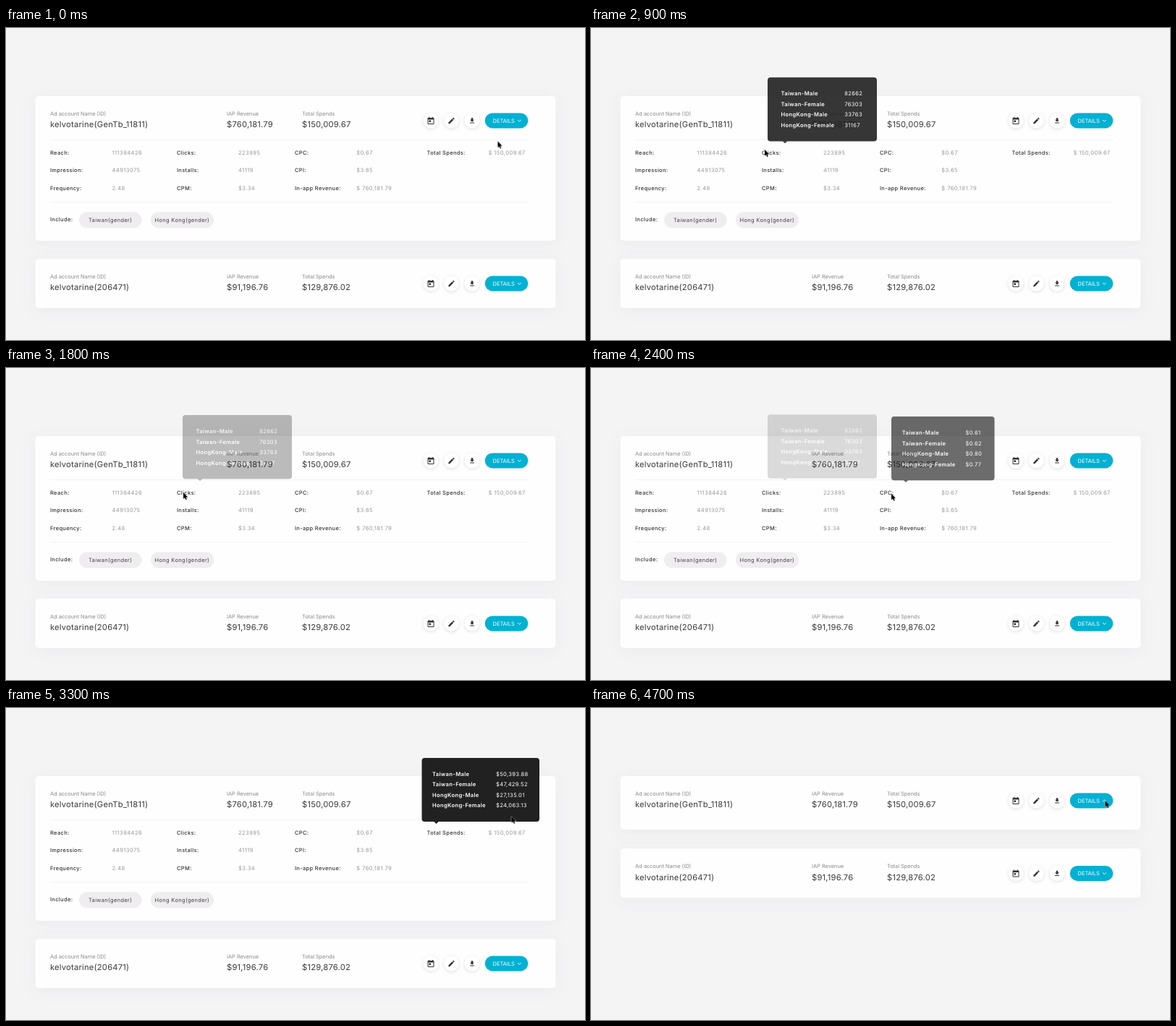
Write an HTML page that moves like this. It is 800 px wide and 431 px high and loops after 4800 ms.

```html
<!DOCTYPE html>
<html lang="en">
<head>
<meta charset="utf-8">
<title>Ad account details</title>
<style>
@property --a { syntax: '<number>'; initial-value: 0; inherits: false; }

html, body { margin: 0; width: 100%; height: 100%; overflow: hidden; background: #f4f4f5; }
svg { display: block; width: 100%; height: 100%; }
text { font: 7.5px Inter, Roboto, sans-serif; letter-spacing: .33px; text-rendering: geometricPrecision; white-space: pre; }

.card { fill: #fefefe; filter: drop-shadow(0 3px 10px rgba(50, 45, 55, .05)); }
.cap { font-size: 7.4px; letter-spacing: 0; fill: #8a8a8a; }
.big { font-size: 11.2px; letter-spacing: .22px; fill: #3a3a3a; }
.key { font-weight: 500; fill: #333; }
.val { font-size: 7.6px; letter-spacing: .42px; fill: #999; }
.chip { fill: #efedef; }
.chipText { fill: #444; }
.rule { stroke: #f3f2f3; }
.round { fill: #fff; filter: drop-shadow(0 1px 2px rgba(0, 0, 0, .13)); }
.icon { fill: #333; }
.button { fill: #00b1d2; }
.buttonText { letter-spacing: 0; fill: #fff; }
.chevron { fill: none; stroke: #fff; stroke-width: .9; transform-box: fill-box; transform-origin: center; }

.tip { opacity: var(--a); transform: translateY(calc((var(--a) - 1) * 5.4px)); }
.tip path, .tip rect { fill: #212121; }
.tip text { font-size: 7.6px; fill: #fff; }
.tip .name { font-weight: 600; letter-spacing: .35px; }
.cursor { fill: #000; stroke: #fff; stroke-width: .7; paint-order: stroke; }

/* Every animation shares one 4.8 s loop; 100 ms is 2.0833%. */
.shrink, .lift, .details, .flip, .tip, .cursor { animation: 4.8s linear infinite; }
.shrink { height: 200px; animation-name: shrink; }
.lift { animation-name: lift; }
.details { animation-name: fade; }
.flip { animation-name: flip; }
.reach { animation-name: reach; }
.clicks { animation-name: clicks; }
.cpc { animation-name: cpc; }
.spends { animation-name: spends; }
.cursor { animation-name: point; }

@keyframes shrink {
  0%, 89.583% { height: 200px; animation-timing-function: ease-in-out; }
  97.917%, 100% { height: 74px; }
}
@keyframes lift {
  0%, 89.583% { transform: translateY(0); animation-timing-function: ease-in-out; }
  97.917%, 100% { transform: translateY(-124.5px); }
}
@keyframes fade {
  0%, 89.583% { opacity: 1; }
  96.5%, 100% { opacity: 0; }
}
@keyframes flip {
  0%, 89.583% { transform: rotate(0); }
  97.917%, 100% { transform: rotate(180deg); }
}
@keyframes reach {
  0%, 20.833% { --a: 0; }
  25% { --a: .65; }
  29.167% { --a: 1; }
  31.25% { --a: .9; }
  35.417% { --a: .2; }
  37.5%, 100% { --a: 0; }
}
@keyframes clicks {
  0%, 12.5% { --a: 0; }
  16.667% { --a: .75; }
  18.75% { --a: .9; }
  22.917% { --a: .25; }
  25% { --a: .03; }
  27.083%, 35.417% { --a: 0; }
  39.583% { --a: .6; }
  41.667% { --a: .95; }
  45.833% { --a: .9; }
  50% { --a: .16; }
  52.083%, 100% { --a: 0; }
}
@keyframes cpc {
  0%, 4.167% { --a: 0; }
  8.333% { --a: .75; }
  10.417% { --a: .93; }
  12.5% { --a: .8; }
  16.667% { --a: .2; }
  18.75%, 45.833% { --a: 0; }
  50% { --a: .66; }
  54.167%, 56.25% { --a: 1; }
  60.417% { --a: .5; }
  62.5% { --a: .14; }
  64.583%, 100% { --a: 0; }
}
@keyframes spends {
  0% { --a: 0; }
  4.167% { --a: .7; }
  8.333% { --a: .2; }
  10.417% { --a: .02; }
  12.5%, 58.333% { --a: 0; }
  62.5% { --a: .57; }
  66.667%, 68.75% { --a: 1; }
  72.917% { --a: .2; }
  75%, 100% { --a: 0; }
}
@keyframes point {
  0% { transform: translate(679.5px, 156.5px); }
  2.083% { transform: translate(655px, 165px); }
  6.25% { transform: translate(480px, 169px); }
  10.417% { transform: translate(397.5px, 165.5px); }
  12.5% { transform: translate(376px, 166px); }
  18.75% { transform: translate(240px, 168px); }
  25% { transform: translate(152.5px, 164.5px); }
  29.167% { transform: translate(130px, 168px); }
  33.333% { transform: translate(195px, 171px); }
  45.833% { transform: translate(345px, 174px); }
  50% { transform: translate(415px, 173.5px); }
  56.25% { transform: translate(505px, 174px); }
  62.5% { transform: translate(635.5px, 171.5px); }
  66.667% { transform: translate(690px, 164px); }
  75%, 77.083% { transform: translate(724px, 107px); }
  79.167% { transform: translate(720px, 110px); }
  87.5%, 100% { transform: translate(710.5px, 128px); }
}
</style>
</head>
<body>
<svg id="stage" viewBox="0 0 800 431"></svg>
<script>
const LOOP = 4800, STEP = 100, LEAD = 20;

const text = (x, y, str, cls) => `<text x="${x}" y="${y}" class="${cls}">${str}</text>`;
const card = (y, height, cls = '') =>
  `<rect class="card ${cls}" x="40.5" y="${y}" width="719" height="${height}" rx="5"/>`;

const ICONS = [
  [587, 11, .5, 'M19 3h-1V1h-2v2H8V1H6v2H5a2 2 0 0 0-2 2v14a2 2 0 0 0 2 2h14a2 2 0 0 0 2-2V5a2 2 0 0 0-2-2zm0 16H5V8h14zM7 10h5v5H7z'],
  [615.5, 12, .46, 'M3 17.2V21h3.8L17.8 9.9l-3.7-3.7zM20.7 7a1 1 0 0 0 0-1.4l-2.3-2.3a1 1 0 0 0-1.4 0l-1.9 1.8 3.8 3.8z'],
  [644, 11.8, .42, 'M19 9h-4V3H9v6H5l7 7zM5 18v2h14v-2z']
];

const icon = ([x, mid, scale, path]) => `
  <circle class="round" cx="${x}" cy="128" r="10.5"/>
  <path class="icon" fill-rule="evenodd" transform="translate(${x} 128) scale(${scale}) translate(-12 ${-mid})" d="${path}"/>`;

const header = (name, revenue, spends, flip = '') =>
  [[61, 'Ad account Name (ID)', name], [305, 'IAP Revenue', revenue], [409, 'Total Spends', spends]]
    .map(([x, cap, big]) => text(x, 120.7, cap, 'cap') + text(x, 137, big, 'big')).join('') +
  ICONS.map(icon).join('') + `
  <rect class="button" x="661.7" y="117.4" width="59.6" height="21" rx="10.5"/>
  ${text(672.5, 130.5, 'DETAILS', 'buttonText')}
  <path class="chevron ${flip}" d="M707 127l2.4 2.2 2.4-2.2"/>`;

const ROWS = [175.2, 199.3, 224.4];
const COLUMNS = [
  [61, 146.5, ['Reach:', '111384426'], ['Impression:', '44913075'], ['Frequency:', '2.48']],
  [236, 321, ['Clicks:', '223895'], ['Installs:', '41119'], ['CPM:', '$3.34']],
  [399, 484.3, ['CPC:', '$0.67'], ['CPI:', '$3.65'], ['In-app Revenue:', '$ 760,181.79']],
  [581.5, 666.5, ['Total Spends:', '$ 150,009.67']]
];

const column = ([keyX, valX, ...cells]) => cells.map(([key, val], i) =>
  text(keyX, ROWS[i], key, 'key') + text(valX, ROWS[i], val, 'val')).join('');

const chip = (x, width, textX, label) =>
  `<rect class="chip" x="${x}" y="254.3" width="${width}" height="22" rx="11"/>` +
  text(textX, 268.2, label, 'chipText');

const rule = y => `<path class="rule" d="M61 ${y}H721"/>`;

const GROUPS = ['Taiwan-Male', 'Taiwan-Female', 'HongKong-Male', 'HongKong-Female'];
const TIPS = [
  ['reach', 77, 167, 24, 96, 183.8, '38806334 35821231 18745999 18010862'],
  ['clicks', 244, 151, 24, 262.5, 350.3, '82662 76303 33763 31167'],
  ['cpc', 415, 142.5, 20, 429.7, 517.5, '$0.61 $0.62 $0.80 $0.77'],
  ['spends', 574.5, 162.5, 20, 589, 677, '$50,393.88 $47,429.52 $27,135.01 $24,063.13']
];

const tip = ([cls, x, width, arrow, nameX, valX, vals]) => `
  <g class="tip ${cls}">
    <rect x="${x}" y="68.9" width="${width}" height="88.2" rx="4"/>
    <path d="M${x + arrow - 3.5} 156.7l3.5 3.2 3.5-3.2z"/>
    ${vals.split(' ').map((val, i) => {
      const y = 94 + i * 14.45;
      return text(nameX, y, GROUPS[i], 'name') + text(valX, y, val, '');
    }).join('')}
  </g>`;

const stage = document.getElementById('stage');
stage.innerHTML = `
  <clipPath id="open"><rect class="shrink" x="40" y="94" width="720"/></clipPath>
  ${card(94, 200, 'shrink')}
  <g clip-path="url(#open)"><g class="details">
    ${rule(154.5)}${rule(240.5)}
    ${COLUMNS.map(column).join('')}
    ${text(61, 267.2, 'Include:', 'key')}
    ${chip(101, 86.5, 114, 'Taiwan(gender)')}
    ${chip(200, 87, 205.5, 'Hong Kong(gender)')}
  </g></g>
  ${header('kelvotarine(GenTb_11811)', '$760,181.79', '$150,009.67', 'flip')}
  <g class="lift">
    ${card(318.8, 68)}
    <g transform="translate(0 225)">${header('kelvotarine(206471)', '$91,196.76', '$129,876.02')}</g>
  </g>
  ${TIPS.map(tip).join('')}
  <path class="cursor" d="M0 0V8.8L2 7 3.3 10 4.8 9.4 3.5 6.5H6.2Z"/>`;

const animations = document.getAnimations();
animations.forEach(a => a.pause());

// Each pose is held for one step.
function draw() {
  const now = (performance.now() + LEAD) % LOOP;
  const held = Math.floor(now / STEP) * STEP;
  animations.forEach(a => { a.currentTime = held; });
  requestAnimationFrame(draw);
}
draw();
</script>
</body>
</html>
```
